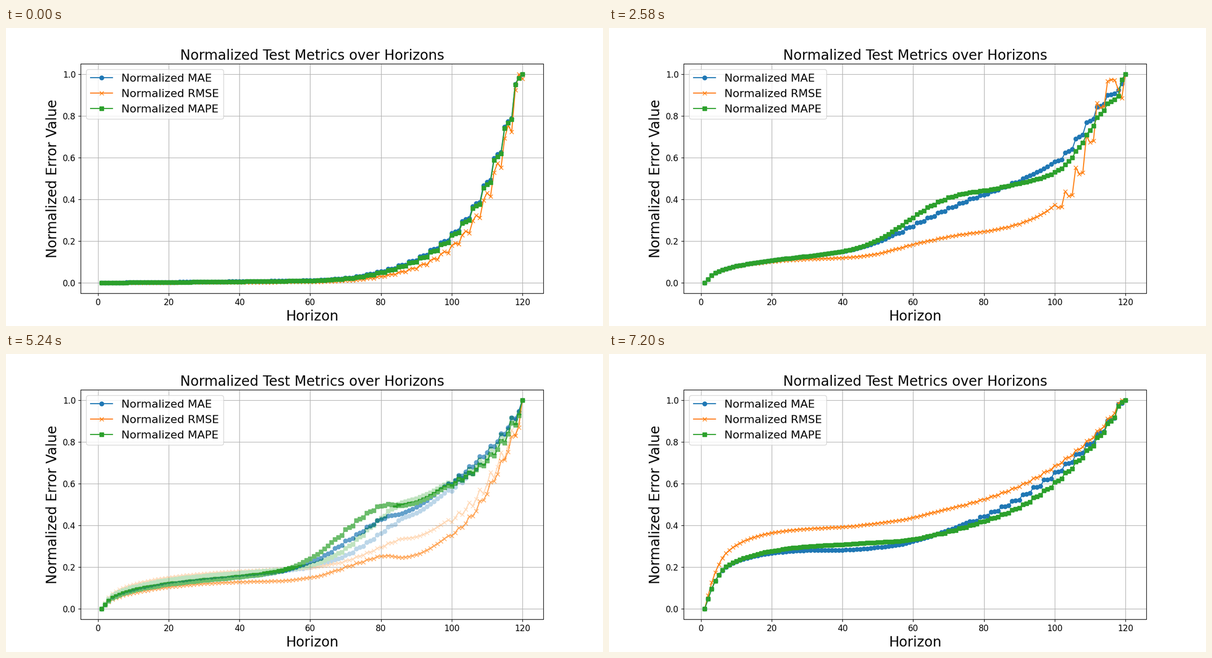
Recreate the animation shown at these times as a matplotlib script. Size 1058 px wide and 529 px high, loop 8 s.

```python
import numpy as np
import matplotlib.pyplot as plt
from matplotlib.animation import FuncAnimation

W, H = 1058, 529
DRAW_DPI = 100                 # charts are drawn larger, then shrunk to the stage
TICK, LOOP = 20, 8000          # ms
FADE_STARTS = [500 + 1540 * i for i in range(5)]
FADE_TICK, FADE_STEPS = 60, 10
X = np.arange(125.0)           # index equals horizon; 1..120 are shown


def through(*points):
    """Shape-preserving cubic through a few key points."""
    xs, ys = np.array(points, float).T
    h = np.diff(xs)
    d = np.diff(ys) / h
    a, b = d[:-1], d[1:]
    same = a * b > 0
    inner = np.where(same, 2 * a * b / np.where(same, a + b, 1), 0)
    m = np.concatenate([d[:1], inner, d[-1:]])
    x = np.clip(X, xs[0], xs[-1])
    i = np.clip(np.searchsorted(xs, x, "right") - 1, 0, len(h) - 1)
    t = (x - xs[i]) / h[i]
    return (ys[i] * (1 + 2 * t) * (1 - t) ** 2
            + ys[i + 1] * t * t * (3 - 2 * t)
            + h[i] * t * (1 - t) * (m[i] * (1 - t) - m[i + 1] * t))


def bump(amp, center, left, right):
    """Bell with its own width on each side."""
    width = np.where(X < center, left, right)
    return amp * np.exp(-0.5 * ((X - center) / width) ** 2)


def lift(amp, tau):
    """Quick rise that fades out towards the last horizon."""
    u = np.maximum(X - 1, 0)
    return amp * (1 - np.exp(-u / tau)) * (1 - u / 119)


def metric(trend, *stairs):
    """Add three-point stairs (start, stop, f1, f2) and scale to 0..1."""
    y = trend.copy()
    for start, stop, f1, f2 in stairs:
        for x in range(start, stop, 3):
            y[x + 1:x + 3] = trend[x] + np.array([f1, f2]) * (trend[x + 3] - trend[x])
    y = y[1:121]
    y[-1] = 1
    return (y - y[0]) / (y.max() - y[0])


def exponential_run():
    mae = through((1, 0), (61, .012), (70, .023), (79, .052), (88, .102), (97, .193),
                  (106, .367), (115, .747), (118, .952), (121, 1.192))
    return (metric(mae, (67, 121, .13, .2)),
            metric(mae ** 1.19, (67, 121, .27, .14)),
            metric(mae ** 1.03, (67, 121, .12, .2)))


def slow_run():
    mae = through((1, 0), (4, .01), (31, .024), (40, .05), (61, .083), (79, .165),
                  (91, .27), (100, .395), (109, .62), (118, .98), (121, 1.09))
    stairs = (70, 121, .12, .18)
    return (metric(mae, stairs),
            metric(mae + lift(.018, 5), stairs),
            metric(mae + bump(.04, 58, 20, 20), stairs))


def jagged_run():
    mae = through((1, 0), (4, .047), (10, .08), (20, .107), (40, .15), (49, .19),
                  (61, .288), (73, .382), (85, .458), (97, .548), (103, .624),
                  (109, .768), (115, .9), (118, .925), (121, 1.225))
    rmse = mae + bump(-.215, 97, 29, 20) + bump(.21, 115, 5.5, 3)
    mape = mae + bump(.052, 67, 9, 9) + bump(-.06, 106, 10, 10)
    return (metric(mae, (55, 91, .12, .3), (100, 121, .1, .25)),
            metric(rmse, (55, 91, .25, .5), (100, 121, -.2, -.15)),
            metric(mape, (55, 121, .25, .5)))


def hump_run():
    mae = through((1, 0), (4, .052), (10, .088), (20, .118), (50, .175), (61, .232),
                  (73, .358), (82, .446), (85, .453), (90, .488), (99, .6),
                  (108, .73), (114, .84), (120, 1))
    rmse = mae + lift(-.015, 5) + bump(-.25, 102, 26, 10.5)
    mape = mae + bump(.068, 76, 9.5, 9.5) + bump(-.042, 110, 7, 7)
    return (metric(mae, (61, 82, .2, .4), (99, 120, -.04, .38)),
            metric(rmse, (67, 82, .15, .4), (99, 120, .05, .38)),
            metric(mape, (67, 82, .22, .42), (99, 120, -.1, .38)))


def ripple_run():
    mae = through((1, 0), (4, .06), (10, .096), (20, .13), (30, .15), (58, .194),
                  (67, .235), (76, .32), (85, .425), (90, .46), (99, .568),
                  (108, .702), (114, .83), (120, 1))
    rmse = mae + lift(.025, 4) + bump(-.15, 103, 20, 10)
    mape = mae + lift(.01, 5) + bump(.075, 84, 10, 12)
    return (metric(mae, (67, 85, .2, .4), (99, 120, -.08, .38)),
            metric(rmse, (67, 85, .15, .4), (99, 120, -.25, .28)),
            metric(mape, (67, 85, .25, .45), (99, 120, -.25, .3)))


def plateau_run():
    mae = through((1, 0), (4, .133), (7, .2), (13, .243), (20, .267), (30, .28),
                  (40, .282), (55, .305), (67, .36), (85, .49), (97, .618),
                  (109, .788), (118, .98), (121, 1.113))
    rmse = mae + lift(.105, 6) + bump(.063, 62, 24, 22)
    mape = mae + bump(.028, 45, 18, 12) + bump(-.05, 96, 14, 12)
    return (metric(mae, (76, 121, .05, .15)),
            metric(rmse, (73, 121, .12, .36)),
            metric(mape, (67, 121, .14, .35)))


def shrink_matrix(n, m):
    """Lanczos weights that resample n pixels to m."""
    r = n / m
    d = ((np.arange(m)[:, None] + 0.5) * r - 0.5 - np.arange(n)) / r
    w = np.where(abs(d) < 3, np.sinc(d) * np.sinc(d / 3), 0)
    return w / w.sum(axis=1, keepdims=True)


def shrink(img):
    h, w, c = img.shape
    rows = (shrink_matrix(h, H) @ img.reshape(h, -1)).reshape(H, w, c)
    out = np.matmul(shrink_matrix(w, W), rows)
    return np.clip(out + 0.5, 0, 255).astype(np.uint8)


fig = plt.figure(figsize=(12, 6), dpi=W / 12, facecolor="white")


def page(run):
    """Draw one chart and return it as an RGB array of the stage's size."""
    fig.clear()
    fig.set_dpi(DRAW_DPI)
    ax = fig.add_subplot()
    for y, name, marker in zip(run, ("MAE", "RMSE", "MAPE"), "oxs"):
        ax.plot(X[1:121], y, marker=marker, label="Normalized " + name)
    ax.set_ylim(-0.05, 1.05)
    ax.set_title("Normalized Test Metrics over Horizons", fontsize=20)
    ax.set_xlabel("Horizon", fontsize=20)
    ax.set_ylabel("Normalized Error Value", fontsize=20)
    ax.tick_params(labelsize=12)
    ax.legend(fontsize=16, loc="upper left")
    ax.grid(True)
    fig.canvas.draw()
    img = np.asarray(fig.canvas.buffer_rgba())[..., :3].astype(float)
    fig.clear()
    fig.set_dpi(W / 12)
    return shrink(img)


runs = (exponential_run, slow_run, jagged_run, hump_run, ripple_run, plateau_run)
pages = [page(run()) for run in runs]
view = fig.figimage(pages[0])


def update(frame):
    t = frame * TICK
    steps = sum(min(max((t - s) // FADE_TICK + 1, 0), FADE_STEPS)
                for s in FADE_STARTS)
    i, r = divmod(steps, FADE_STEPS)
    img = pages[i]
    if r:
        mix = r / FADE_STEPS
        img = (img * (1 - mix) + pages[i + 1] * mix + 0.5).astype(np.uint8)
    view.set_data(img)
    return [view]


anim = FuncAnimation(fig, update, frames=LOOP // TICK, interval=TICK,
                     repeat=True, repeat_delay=0)
plt.show()
```
